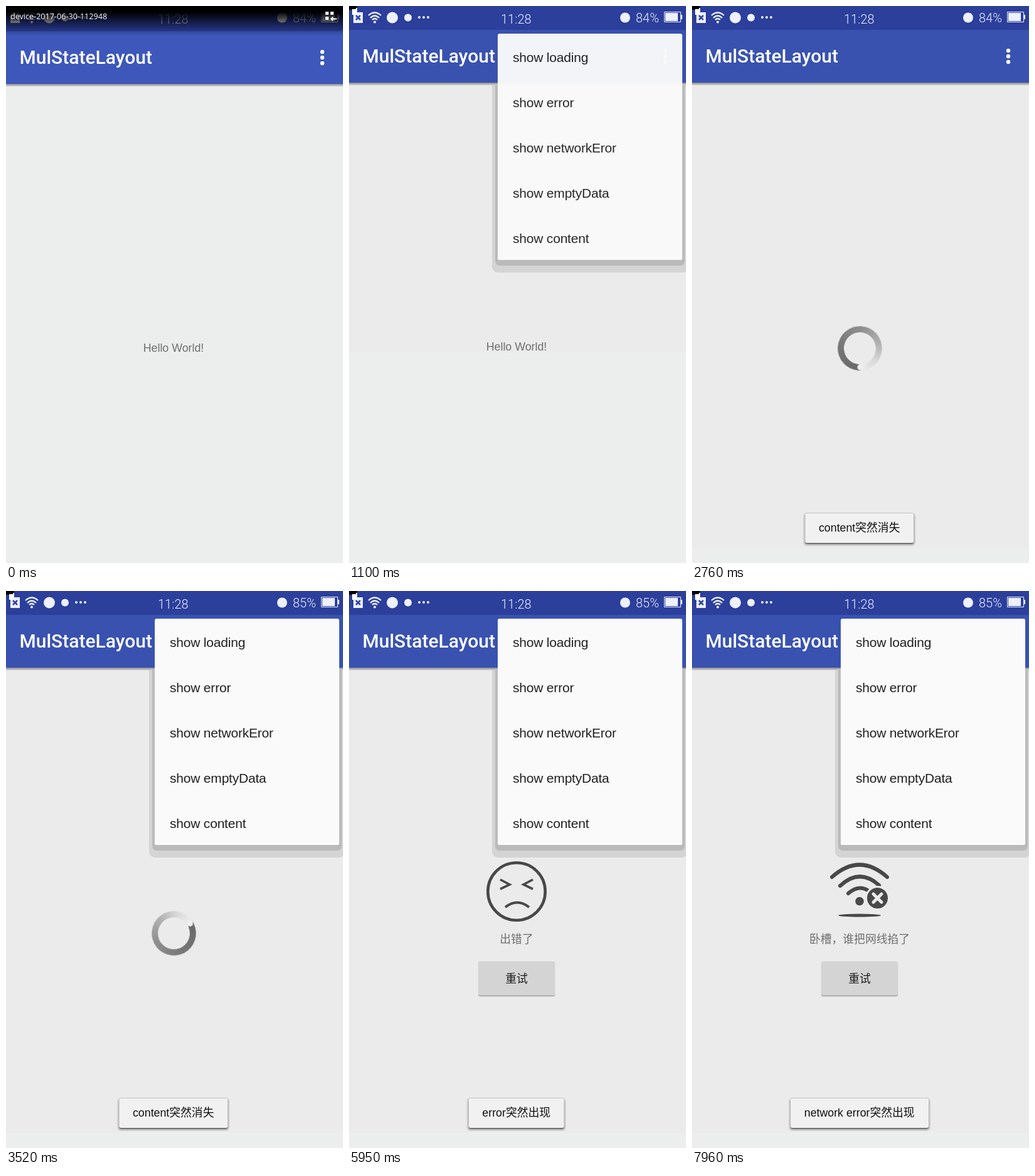
An HTML page for the animation above (8 s loop, 537x886 px).

```html
<!DOCTYPE html>
<html lang="zh">
<head>
<meta charset="utf-8">
<title>MulStateLayout</title>
<style>
html, body { margin: 0; width: 100%; height: 100%; overflow: hidden; }
body { position: relative; background: #ebeeed; font: 17.8px/24px "Liberation Sans", "Noto Sans CJK SC", "Noto Sans CJK", sans-serif; }
body * { position: absolute; box-sizing: border-box; white-space: nowrap; }

/* every timeline shares one 8 s clock: 1% = 80 ms */
.anim { animation: 8s step-end infinite; }

.stage, .app, svg { left: 0; top: 0; width: 537px; height: 886px; }
.stage { overflow: hidden; }
.panel { width: 537px; height: 0; background: #ebebeb; animation-name: panel; }
.app { animation-name: settle; }
.bars { width: 537px; height: 122px; background: linear-gradient(#2e43a5 38px, #3d57bb 38px); box-shadow: 0 2px 2px 1px #0005; animation-name: dim; }
.title { left: 21.5px; top: 60px; font: 500 30px/40px Roboto, sans-serif; color: #fff; }
.middle { left: 0; width: 537px; text-align: center; text-indent: -3px; color: #6f6f6f; }
.hello { top: 530px; animation-name: hello; }
.error { animation-name: error; }
.network { animation-name: network; }
.caption { top: 542px; }
.retry { left: 206px; top: 589px; width: 122px; height: 54px; line-height: 56px; border-radius: 3px; background: #d4d4d4; color: #1c1c1c; text-align: center; box-shadow: 0 2px 1px #0004; }

.loading { animation-name: loading; }
.ring { left: 231.5px; top: 508.5px; width: 71px; height: 71px; border-radius: 50%;
  background: conic-gradient(#686868, #767676 25%, #8e8e8e 50%, #b0b0b0 70%, #d8d8d8 85%, #ededed 98%, #999 99%, #686868);
  -webkit-mask: radial-gradient(circle, transparent 25px, #000 25.7px);
  mask: radial-gradient(circle, transparent 25px, #000 25.7px);
  animation-name: spin; }
.ring::after { content: ""; position: absolute; left: 29px; top: 1px; width: 9px; height: 9px; border-radius: 50%; background: #eee; }

.toast { left: 266.7px; top: 807px; height: 47px; padding: 0 22px; line-height: 47px; transform: translateX(-50%); border-radius: 3px; background: #f1f1f1; color: #111; box-shadow: 0 2px 2px #0008, 0 2px 0 3px #0000001c, 0 -1px 0 #0001; opacity: 0; }
.gone { animation-name: toastA; }
.failed { animation-name: toastB; }
.offline { animation-name: toastC; }

.menu, .shade { left: 237px; top: 44px; width: 294px; height: 360px; border-radius: 3px; }
.shade { box-shadow: 0 5px 0 4px #0000001f, 0 11px 0 9px #00000019; clip-path: inset(82px -10px -30px -20px); animation-name: shade; }
.menu { background: #fafafa; font-size: 21px; letter-spacing: -.2px; color: #212121; overflow: hidden; animation-name: menu; }
.menu div { position: static; height: 72px; padding: 2px 0 0 24px; line-height: 72px; }
.row1 { animation-name: press1; }
.row2 { animation-name: press2; }
.row3 { animation-name: press3; }

.clock, .level { font: 300 20px/24px Roboto, sans-serif; color: #eef0fb; }
.clock { left: 242px; top: 9px; }
.level { left: 457px; top: 7px; }
.p84 { animation-name: before; }
.p85 { animation-name: after; }
.corner { animation-name: corner; }

.overlay { width: 537px; height: 48px; background: linear-gradient(#000 9px, #0000 47px); animation-name: overlay; }
.overlay span { left: 7px; top: 8px; font: 12.6px/17px "Open Sans", "Noto Sans", sans-serif; color: #fff; }

@keyframes panel { 0% { height: 0; } 1.45% { height: 551px; } 27.7%, 100% { height: 862px; } }
@keyframes settle { 0% { transform: translateY(2px); } 1.45%, 100% { transform: none; } }
@keyframes dim { 0%, 55.55% { filter: none; } 10.2%, 67.45%, 100% { filter: brightness(.94); } }
@keyframes hello { 0% { opacity: 1; } 30.95%, 100% { opacity: 0; } }
@keyframes loading { 0%, 52.45%, 100% { opacity: 0; } 30.95% { opacity: 1; } }
@keyframes error { 0%, 84.3%, 100% { opacity: 0; } 52.45% { opacity: 1; } }
@keyframes network { 0% { opacity: 0; } 84.3%, 100% { opacity: 1; } }
@keyframes spin {
  0% { transform: rotate(103deg); }
  31.25% { transform: rotate(103deg); animation-timing-function: steps(14); }
  53.42%, 100% { transform: rotate(663deg); }
}
@keyframes toastA { 0%, 55.55%, 100% { opacity: 0; } 32.7%, 54.05% { opacity: .5; } 34.45% { opacity: 1; } }
@keyframes toastB { 0%, 79.3%, 100% { opacity: 0; } 55.55%, 77.7% { opacity: .5; } 57.4% { opacity: 1; } }
@keyframes toastC { 0% { opacity: 0; } 87.8% { opacity: .5; } 89.3%, 100% { opacity: 1; } }
@keyframes menu {
  0%, 32.7%, 54.05%, 87.8% { opacity: 0; }
  10.2%, 96% { opacity: .3; }
  11.95%, 42.3%, 67.45%, 97.7% { opacity: .75; }
  13.7% { opacity: .965; }
  15.6%, 43.95%, 69.2%, 99.45%, 100% { opacity: 1; }
  84.3% { opacity: .6; }
  30.95%, 52.45%, 85.95% { opacity: .24; }
}
@keyframes shade {
  0%, 30.95%, 52.45%, 84.3% { opacity: 0; }
  11.95%, 42.3%, 67.45%, 97.7% { opacity: .6; }
  13.7%, 43.95%, 69.2%, 99.45%, 100% { opacity: 1; }
}
@keyframes press1 { 0%, 32.7%, 100% { background: none; } 27.7% { background: #ebebeb; } }
@keyframes press2 { 0%, 54.05%, 100% { background: none; } 50.8% { background: #ebebeb; } }
@keyframes press3 { 0%, 87.8%, 100% { background: none; } 82.7% { background: #ebebeb; } }
@keyframes before { 0% { opacity: 1; } 42.3%, 100% { opacity: 0; } }
@keyframes after { 0% { opacity: 0; } 42.3%, 100% { opacity: 1; } }
@keyframes corner { 0% { opacity: 0; } 4.95%, 100% { opacity: 1; } }
@keyframes overlay { 0% { opacity: 1; } 1.45% { opacity: .6; } 3.2% { opacity: .3; } 4.95%, 100% { opacity: 0; } }
</style>
</head>
<body>
<div class="stage">
  <div class="panel anim"></div>

  <div class="app anim">
    <div class="bars anim"></div>
    <div class="title">MulStateLayout</div>
    <svg fill="#fff"><circle cx="504" cy="71" r="3.2"/><circle cx="504" cy="80" r="3.2"/><circle cx="504" cy="89" r="3.2"/></svg>
    <div class="middle hello anim">Hello World!</div>
  </div>

  <div class="loading anim"><div class="ring anim"></div></div>

  <div class="error anim">
    <svg fill="none" stroke="#484848" stroke-width="4">
      <circle cx="267" cy="478" r="45.7" stroke-width="4.6"/>
      <path d="M241 459L256 467L241 474M293 459L278 467L293 474" stroke-width="3.6"/>
      <path d="M249 503Q268 488 287 503"/>
    </svg>
    <div class="middle caption">出错了</div>
    <div class="retry">重试</div>
  </div>

  <div class="network anim">
    <svg fill="none" stroke="#484848" stroke-width="6" stroke-linecap="round">
      <path d="M223 455Q267 416 311 455M236 469Q267 440 298 468M249 481Q265 467 280 476"/>
      <circle cx="267" cy="493.500" r="6.800" fill="#484848" stroke="none"/>
      <circle cx="295.500" cy="488.500" r="18" fill="#484848" stroke="#ebebeb" stroke-width="3"/>
      <path d="M289 482l13 13m0-13l-13 13" stroke="#ebebeb" stroke-width="5"/>
      <ellipse cx="267" cy="516" rx="34" ry="2.500" fill="#484848" stroke="none"/>
    </svg>
    <div class="middle caption">卧槽，谁把网线掐了</div>
    <div class="retry">重试</div>
  </div>

  <div class="toast gone anim">content突然消失</div>
  <div class="toast failed anim">error突然出现</div>
  <div class="toast offline anim">network error突然出现</div>

  <div class="shade anim"></div>
  <div class="menu anim">
    <div class="row1 anim">show loading</div>
    <div class="row2 anim">show error</div>
    <div class="row3 anim">show networkEror</div>
    <div>show emptyData</div>
    <div>show content</div>
  </div>

  <svg fill="#eef0fb">
    <path d="M7 10H22V27H7Z"/>
    <path d="M11 15l7 7m0-7l-7 7" stroke="#2e43a5" stroke-width="2.500"/>
    <path d="M31 15Q41 6 51 15M34 19Q41 12 48 19M37 22Q41 18 45 22" fill="none" stroke="#eef0fb" stroke-width="2.200"/>
    <circle cx="41" cy="25.500" r="2"/>
    <circle cx="69" cy="18.500" r="9"/>
    <circle cx="94" cy="18.500" r="6"/>
    <circle cx="112" cy="18" r="2"/><circle cx="119" cy="18" r="2"/><circle cx="126" cy="18" r="2"/>
    <circle cx="440" cy="18.500" r="8"/>
    <path d="M502.500 9.500H528.500V25.500H502.500Z" fill="none" stroke="#eef0fb"/>
    <path d="M504 11H524V24H504ZM529 14H531V21H529Z"/>
  </svg>
  <div class="clock">11:28</div>
  <div class="level p84 anim">84%</div>
  <div class="level p85 anim">85%</div>
  <svg class="corner anim"><path d="M0 0H13V3H11V5H5V6H0Z"/><path d="M5 5H11V3H13V13H7V14H5Z" fill="#fff"/></svg>

  <div class="overlay anim">
    <span>device-2017-06-30-112948</span>
    <svg fill="#fff"><path d="M509 9h5v5h-5zM517 9h5v5h-5zM509 17h5v5h-5zM517 20.500l4-4v3h6v2h-6v3z"/></svg>
  </div>
</div>
</body>
</html>
```
